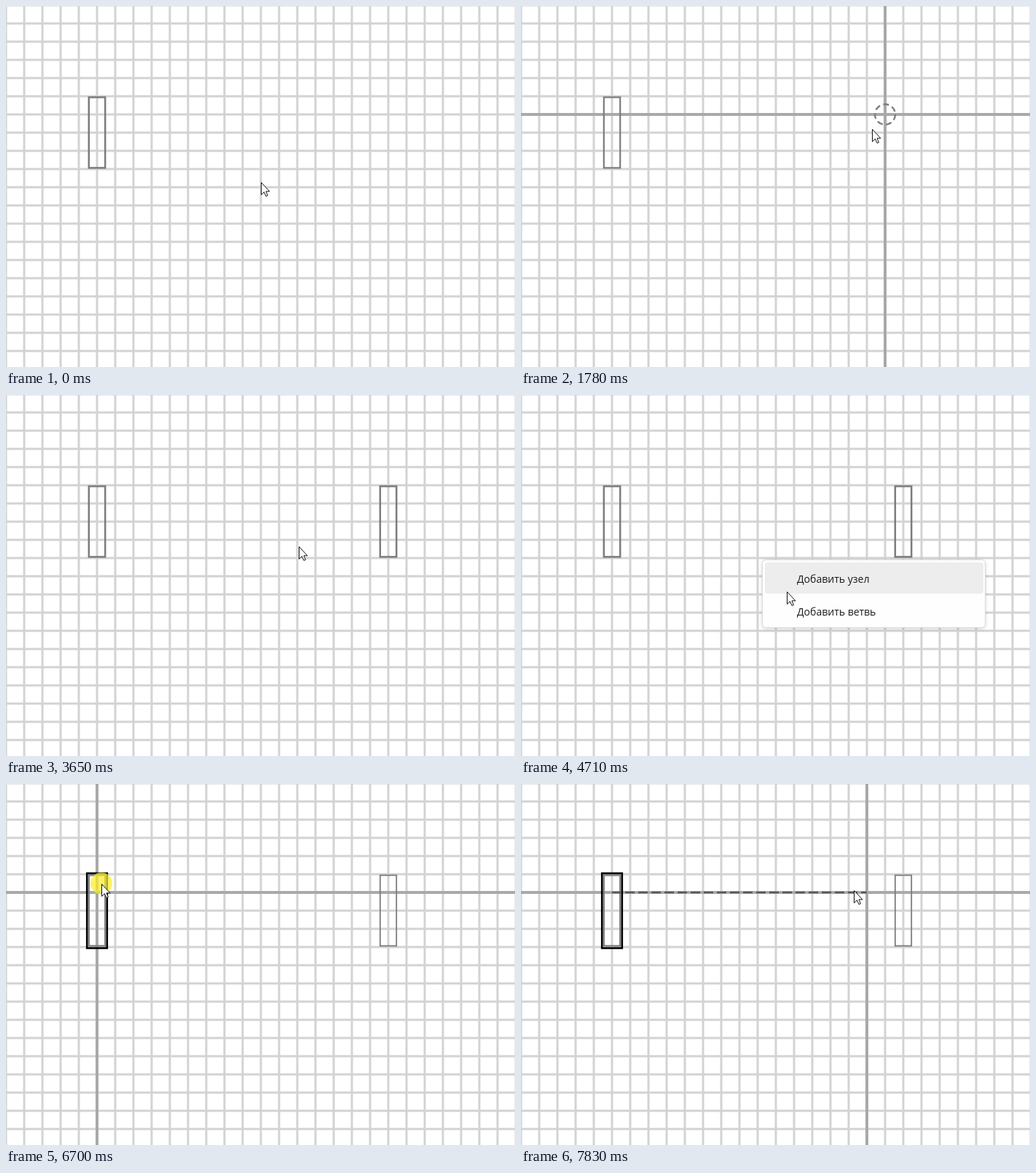
Recreate the animation shown at these times as an HTML page. Size 699x496 px, loop 8000 ms.

```html
<!DOCTYPE html>
<html lang="ru">
<head>
<meta charset="utf-8">
<style>
  html, body { margin: 0; width: 100%; height: 100%; overflow: hidden; background: #fff; }
  svg { display: block; width: 699px; height: 496px; }
  .menu text { font: 14.05px "Open Sans", "Noto Sans", sans-serif; fill: #1c1c1c; }
  .panel { fill: #fefefe; stroke: #dcdcdc; filter: drop-shadow(0 1px 2px rgba(0, 0, 0, .18)); }
  .hover { fill: #ededed; }
  .node { fill: none; stroke: #7c7c7c; }
</style>
</head>
<body>
<svg viewBox="0 0 699 496">
  <path id="grid" fill="none" stroke="#d3d3d3" stroke-width="3"/>
  <path id="cross" stroke="#a9a9a9" stroke-width="4"/>
  <rect id="left" class="node"/>
  <rect id="right" class="node"/>
  <rect id="ring" x="111.2" y="122.7" width="27.6" height="102.8" fill="none" stroke="#000" stroke-width="2.6"/>
  <circle id="target" r="14" fill="none" stroke="#808080" stroke-width="2.5" stroke-dasharray="8 4.57"/>
  <path id="branch" stroke="#585858" stroke-width="2.5" stroke-dasharray="13 5"/>
  <g id="menuA" class="menu"></g>
  <g id="menuB" class="menu"></g>
  <circle id="press" r="15" fill="#fbee28" fill-opacity=".72"/>
  <path id="cursor" d="M.5.5V17.3L4.4 13.6L7 19.4L9.4 18.4L7 12.8H12Z" fill="#fff" stroke="#111"/>
</svg>
<script>
const LOOP = 8000;
const CELL = 25;
const $ = id => document.getElementById(id);

// pointer moves; "via" bends the path, otherwise it is straight
const start = [350, 242];
const moves = [
  { from: 680, to: 1060, end: [398, 278] },
  { from: 1320, to: 2080, end: [526, 155], via: [462, 153] },
  { from: 2550, to: 2870, end: [526, 205] },
  { from: 3480, to: 3800, end: [321, 216], via: [401, 204] },
  { from: 4470, to: 4890, end: [373, 288], via: [373, 274] },
  { from: 5220, to: 5340, end: [330, 240] },
  { from: 5570, to: 6210, end: [131, 137], via: [289, 142] },
  { from: 6930, to: 7830, end: [457, 146] }
];

const clamp = v => Math.max(0, Math.min(1, v));
const smooth = k => k * k * (3 - 2 * k);
const snap = (v, shift) => Math.round((v + shift) / CELL) * CELL - shift;
const during = (t, from, to) => t >= from && t < to;

function pointerAt(t) {
  let at = start;
  for (const { from, to, end, via } of moves) {
    if (t < from) break;
    const s = smooth(clamp((t - from) / (to - from)));
    at = at.map((a, i) => {
      const mid = via ? via[i] : (a + end[i]) / 2;
      return (1 - s) ** 2 * a + 2 * s * (1 - s) * mid + s * s * end[i];
    });
  }
  return at;
}

// guide lines snap to the grid near the pointer, trailing it a little in the second half
function guideAt(t) {
  const [x, y] = pointerAt(during(t, 5220, 6930) ? t - 90 : t);
  return [snap(x + 6, 0), snap(t < 5220 ? y - 8 : y, 1)];
}

function set(el, attrs) {
  for (const name in attrs) el.setAttribute(name, attrs[name]);
}

function show(el, on) {
  el.style.display = on ? "" : "none";
}

function placeNode(el, x, top, bottom, weight) {
  set(el, { x: x - 11.2, y: top - 23.6, width: 22.4, height: bottom - top + 47, "stroke-width": weight });
}

function buildMenu(el, x, y, labels) {
  const height = 4 + labels.length * 45;
  el.innerHTML = `<rect class="panel" x="${x + .5}" y="${y + .5}" width="306" height="${height - 1}" rx="5"/>` +
    labels.map((label, i) => `<rect class="hover" x="${x + 4}" y="${y + 4 + i * 45}" width="300" height="43" rx="4"/>` +
      `<text x="${x + 48}" y="${y + 31.5 + i * 45}">${label}</text>`).join("");
  return { el, x, y, height, hovers: el.querySelectorAll(".hover") };
}

function drawMenu(menu, t, open, close, px, py) {
  show(menu.el, during(t, open, close + 100));
  const grow = 1 - (1 - clamp((t - open) / 180)) ** 3;
  menu.el.style.opacity = Math.min(clamp((t - open + 30) / 90), clamp((close + 100 - t) / 100));
  menu.el.style.clipPath = grow < 1 ? `inset(-4px -4px ${(1 - grow) * menu.height / 2}px -4px)` : "none";
  menu.hovers.forEach((bar, i) => {
    const top = menu.y + 4 + i * 45;
    show(bar, px > menu.x + 4 && py >= top && py < top + 44.5);
  });
}

let grid = "";
for (let v = 0; v < 725; v += CELL) grid += `M${v} 0V496M0 ${v - 1}H699`;
$("grid").setAttribute("d", grid);

const menuA = buildMenu($("menuA"), 360, 252, ["Добавить узел"]);
const menuB = buildMenu($("menuB"), 331, 226, ["Добавить узел", "Добавить ветвь"]);

function draw(t) {
  const [px, py] = pointerAt(t);
  const [cx, cy] = guideAt(t);
  const guided = during(t, 1320, 3260) || t >= 5220;
  const chosen = t >= 6700;

  show($("cross"), guided);
  $("cross").setAttribute("d", `M${cx} 0V496M0 ${cy}H699`);
  show($("target"), during(t, 1320, 2550));
  set($("target"), { cx, cy });

  placeNode($("left"), 125, 149, 199, guided ? 2.2 : 2.5);
  show($("right"), t >= 2550);
  placeNode($("right"), 525, 149, t < 2870 ? cy : 199, chosen ? 1.8 : guided ? 2.2 : 2.5);
  show($("ring"), chosen);

  show($("branch"), t >= 6930 && cx > 125);
  $("branch").setAttribute("d", `M125 149H${cx}`);

  drawMenu(menuA, t, 630, 1320, px, py);
  drawMenu(menuB, t, 4260, 5220, px, py);

  show($("press"), during(t, 360, 630) || during(t, 6700, 6930));
  set($("press"), { cx: px, cy: py - .5 });
  $("cursor").setAttribute("transform", `translate(${Math.round(px)} ${Math.round(py)})`);
}

function tick() {
  draw(performance.now() % LOOP);
  requestAnimationFrame(tick);
}
tick();
</script>
</body>
</html>
```
